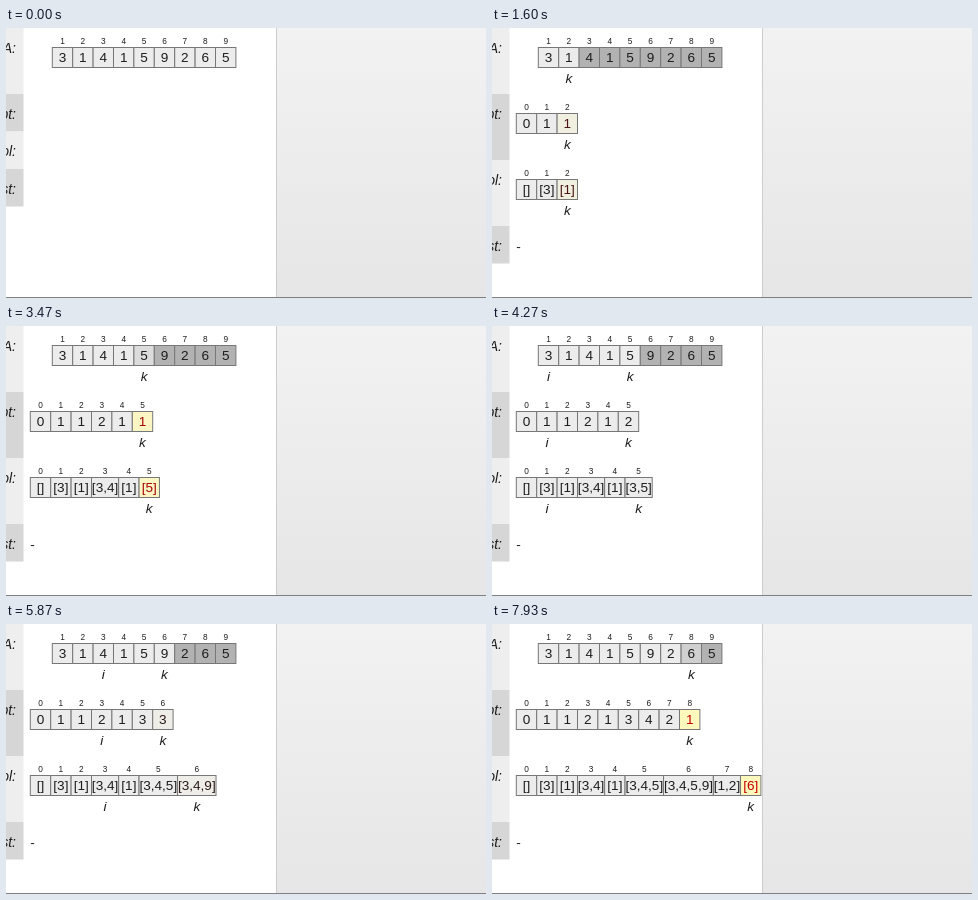
An HTML page with a canvas that plays this animation: 480 px wide and 270 px high, repeating every 8 s.

```html
<!DOCTYPE html>
<html lang="en">
<head>
<meta charset="utf-8">
<title>Longest increasing subsequence</title>
<style>
html, body { margin: 0; width: 100%; height: 100%; overflow: hidden; background: #fff; }
canvas { display: block; }
</style>
</head>
<body>
<canvas id="stage" width="480" height="270"></canvas>
<script>
const ctx = document.getElementById("stage").getContext("2d");
const A = [3, 1, 4, 1, 5, 9, 2, 6, 5];
const LOOP = 8000, INIT = 66, START = 866, STEP = 500, FADE = 300, PEAK = 60;
const CELL = 20.4, ROW = 66, SHORT_ROW = 37.5;
const FONT = '"Liberation Sans", Arial, sans-serif';
const INK = [30, 30, 30], RED = [200, 0, 0];
const LIGHT = [236, 236, 236], DARK = [178, 178, 178], YELLOW = [255, 248, 187];

const mix = (a, b, p) => `rgb(${a.map((v, n) => Math.round(v + (b[n] - v) * p))})`;
const clamp = v => Math.min(1, Math.max(0, v));
const easeOut = u => 1 - (1 - clamp(u)) ** 3;
const flash = age => age < PEAK ? age / PEAK : clamp(1 - (age - PEAK) / (FADE - PEAK));

// Run the algorithm once: a step for each new k and each improving i.
const steps = [{ t: INIT, k: 0, i: 0, seq: [] }];
const best = [[]];
function record(k, i, seq) {
  best[k] = seq;
  steps.push({ t: START + STEP * (steps.length - 1), k, i, seq });
}
A.forEach((value, n) => {
  const k = n + 1;
  record(k, 0, [value]);
  for (let i = 1; i < k; i++) {
    if (A[i - 1] < value && best[i].length + 1 > best[k].length) record(k, i, [...best[i], value]);
  }
});

function rect(x, y, w, h, fill) {
  ctx.fillStyle = fill;
  ctx.fillRect(x, y, w, h);
}

function text(str, x, y, { size = 13.6, italic = false, align = "center", color = mix(INK, INK, 0) } = {}) {
  ctx.font = `${italic ? "italic " : ""}${size}px ${FONT}`;
  ctx.textAlign = align;
  ctx.fillStyle = color;
  ctx.fillText(str, x, y);
}

// cells: [{ label, fill, color }]; marks: { letter: cell position }
function table(x, y, cells, firstIndex, marks) {
  cells.forEach(({ label, fill, color }, n) => {
    ctx.font = `13.6px ${FONT}`;
    const w = Math.max(CELL, ctx.measureText(label).width + 0.7);
    const mid = x + w / 2;
    rect(x, y + 19.5, w, 20, fill);
    ctx.strokeStyle = "#777";
    ctx.strokeRect(x, y + 19.5, w, 20);
    text(label, mid, y + 34.4, { color });
    text(n + firstIndex, mid, y + 16, { size: 8.3 });
    for (const letter in marks) {
      if (marks[letter] && marks[letter] === n + firstIndex) text(letter, mid, y + 54.5, { italic: true });
    }
    x += w;
  });
}

function drawLabels(open) {
  let y = 0;
  ["A:", "Opt:", "Sol:", "Best:"].forEach((label, n) => {
    const tall = n === 0 || (open && n < 3);
    const h = tall ? ROW : SHORT_ROW;
    rect(0, y, 17.5, h, n % 2 ? "#d6d6d6" : "#eee");
    text(label, 10, y + 24.8, { size: 14, italic: true, align: "right" });
    y += h;
  });
}

function drawPanel() {
  const shade = ctx.createLinearGradient(0, 0, 0, 270);
  shade.addColorStop(0, "#f2f2f2");
  shade.addColorStop(1, "#e6e6e6");
  rect(270, 0, 210, 270, shade);
  rect(270, 0, 1, 270, "#ccc");
  rect(0, 269, 480, 1, "#808080");
}

function draw(t) {
  rect(0, 0, 480, 270, "#fff");
  drawPanel();
  const done = steps.filter(s => s.t <= t);
  drawLabels(done.length > 0);

  const { k = 0, i = 0 } = done[done.length - 1] || {};
  const reached = n => done.find(s => s.k === n);
  const dimming = easeOut((t - START) / FADE);
  table(46.3, 0, A.map((label, n) => {
    const lit = reached(n + 1);
    const shade = n === 0 ? 0 : lit ? 1 - easeOut((t - lit.t) / FADE) : dimming;
    return { label, fill: mix(LIGHT, DARK, shade), color: mix(INK, INK, 0) };
  }), 1, { i, k });

  if (!done.length) return;
  const latest = [];
  for (const s of done) latest[s.k] = s;
  const cells = show => latest.map(s => {
    const glow = flash(t - s.t);
    return { label: show(s.seq), fill: mix(LIGHT, YELLOW, glow), color: mix(INK, RED, glow) };
  });
  table(24.3, ROW, cells(seq => `${seq.length}`), 0, { i, k });
  table(24.3, 2 * ROW, cells(seq => `[${seq}]`), 0, { i, k });
  text("-", 24.2, 3 * ROW + 24.8, { align: "left" });
}

function frame() {
  draw(performance.now() % LOOP);
  requestAnimationFrame(frame);
}
frame();
</script>
</body>
</html>
```
